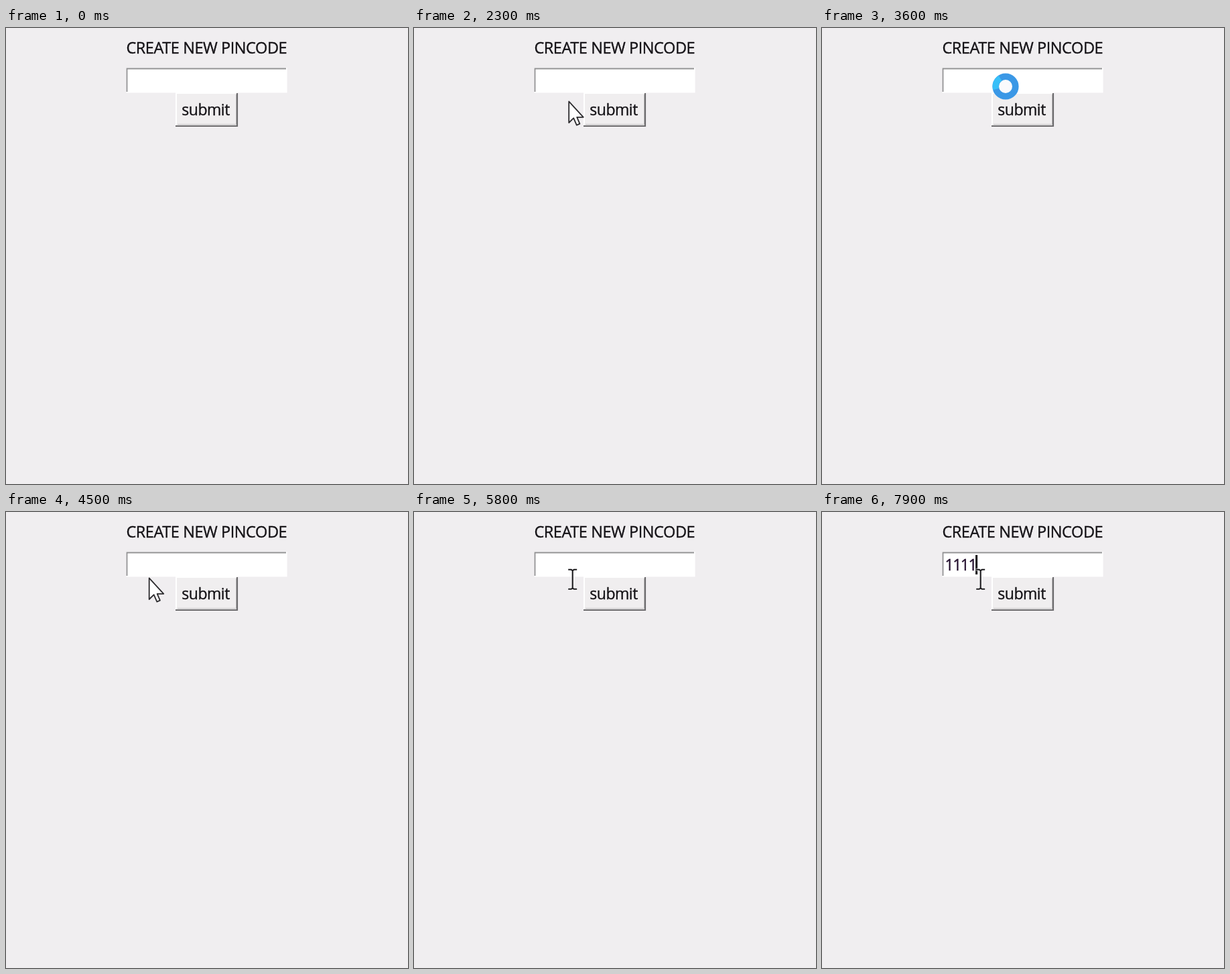
Animation of 600x679 px, one loop 8 s. Source, as an HTML page:

```html
<!DOCTYPE html>
<html lang="en">
<head>
<meta charset="utf-8">
<title>Create new pincode</title>
<style>
  html, body { margin: 0; width: 100%; height: 100%; overflow: hidden; background: #f0eef0; }
  svg { display: block; width: 100vw; height: 100vh; }
  text {
    font: 23.5px "Open Sans", "Noto Sans", sans-serif; letter-spacing: -.44px;
    fill: #141216; stroke: #141216; stroke-width: .35px;
  }
  #label { font-size: 23px; letter-spacing: -.5px; }
  #digits { font-size: 23px; letter-spacing: -1.5px; fill: #24102e; stroke: #24102e; }
</style>
</head>
<body>
<svg viewBox="0 0 600 679">
  <rect width="600" height="679" fill="#f0eef0"/>
  <text x="179.4" y="38">CREATE NEW PINCODE</text>

  <rect x="179.5" y="59" width="240" height="37.5" fill="#fff"/>
  <path d="M180.5 95V60.5H418" fill="none" stroke="#929193" stroke-width="1.8"/>
  <text id="digits" x="183.5" y="86.5"></text>
  <rect id="caret" y="64" width="3" height="29" fill="#0c080e"/>

  <rect x="253" y="96" width="93" height="51" fill="#f0eeef"/>
  <path d="M254 146V97H345" fill="none" stroke="#fff" stroke-width="2"/>
  <path d="M256 143.5H343.5V99" fill="none" stroke="#c4c2c4"/>
  <path d="M253 146H345V97" fill="none" stroke="#6c6b6d" stroke-width="2.2"/>
  <text id="label" x="262.3" y="130">submit</text>

  <g id="arrow">
    <path d="M1.2 1.4V33L8.2 26.2L12.8 36.6L17.4 34.6L13.2 24.8H22.8Z" fill="#fff" stroke="#2c2b2e" stroke-width="1.8" stroke-linejoin="round"/>
  </g>
  <g id="ring" fill="none">
    <circle r="10.5" fill="#fafafc"/>
    <circle r="14.8" stroke="#3b98e6" stroke-width="9.6"/>
    <path d="M-14.2 4A14.8 14.8 0 0 1 -8 -12.4" stroke="#38bff8" stroke-width="9.2"/>
  </g>
  <g id="beam" fill="none">
    <path d="M-7 -14.5H7M0 -14V14M-7 14.5H7" stroke="#fff" stroke-opacity=".7" stroke-width="4"/>
    <path d="M-6.5 -14.5H-2L0 -13L2 -14.5H6.5M0 -13V13M-6.5 14.5H-2L0 13L2 14.5H6.5" stroke="#1c1b1e" stroke-width="2.1"/>
  </g>
</svg>
<script>
const LOOP = 8000, STEP = 100;
const byId = id => document.getElementById(id);
const cursors = ["arrow", "ring", "beam"].map(byId);

// Pointer stops: [start time, shape, x, y]; each holds until the next.
const stops = [
  [400, "ring", 291, 110], [500, "ring", 308, 95],
  [2300, "arrow", 230, 108], [2400, "arrow", 172, 182], [2500, "arrow", 142, 222],
  [3200, "arrow", 193, 125], [3300, "arrow", 242, 104],
  [3400, "ring", 296, 94], [3500, "ring", 290, 88], [3600, "ring", 274, 87],
  [3700, "ring", 258, 87], [3800, "arrow", 231, 98], [3900, "arrow", 215, 99], [4000, "arrow", 208, 99],
  [4500, "arrow", 212.5, 97], [4600, "beam", 218, 93], [4700, "beam", 222, 91],
  [4900, "beam", 227, 92], [5100, "beam", 232, 95], [5300, "beam", 236.7, 100.3]
];
const keyTimes = [6500, 6900, 7300, 7800];
const FOCUS = 5200, CARET_ON = 600, CARET_CYCLE = 900;

function render(time) {
  const t = Math.floor(time % LOOP / STEP) * STEP;

  const stop = stops.filter(s => s[0] <= t).pop();
  for (const cursor of cursors) {
    const shown = stop && stop[1] === cursor.id;
    cursor.style.display = shown ? "" : "none";
    if (shown) cursor.setAttribute("transform", `translate(${stop[2]} ${stop[3]})`);
  }

  const typed = keyTimes.filter(k => k <= t).length;
  byId("digits").textContent = "1".repeat(typed);

  const caretOn = t >= FOCUS && (t - FOCUS) % CARET_CYCLE < CARET_ON;
  byId("caret").style.display = caretOn ? "" : "none";
  byId("caret").setAttribute("x", 182.3 + 11.7 * typed);
}

const start = performance.now();
function tick() {
  render(performance.now() - start);
  requestAnimationFrame(tick);
}
tick();
</script>
</body>
</html>
```
